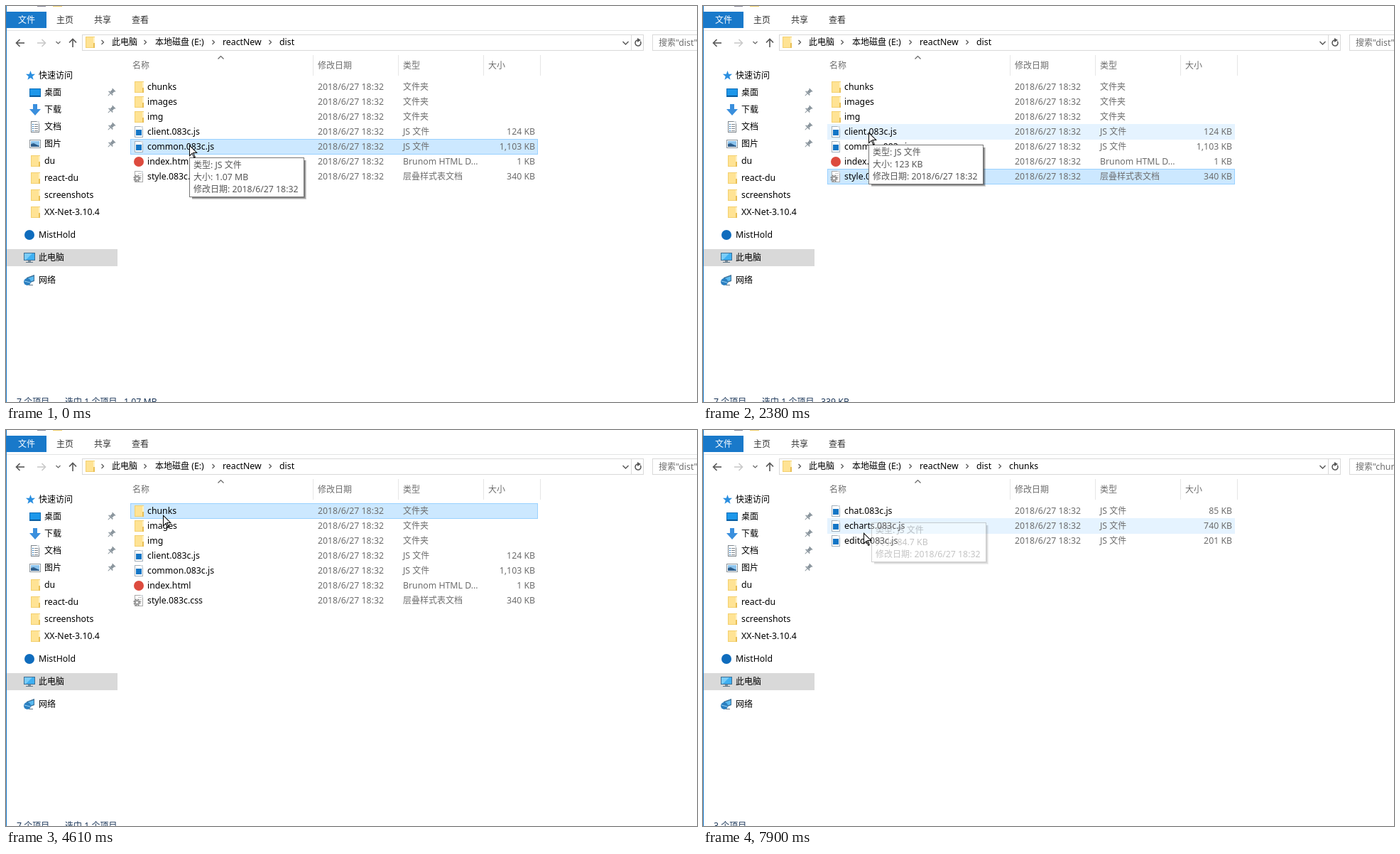
Write an HTML page with a canvas that moves like this. It is 973 by 557 pixels and loops after 8 s.

```html
<!DOCTYPE html>
<html lang="zh-CN">
<head>
<meta charset="utf-8">
<title>dist</title>
<style>
html, body { margin: 0; width: 100%; height: 100%; overflow: hidden; background: #fff; }
canvas { display: block; width: 973px; height: 557px; }
</style>
</head>
<body>
<canvas id="stage" width="973" height="557"></canvas>
<script>
const ctx = document.getElementById('stage').getContext('2d');
const LOOP = 8000, ROW_Y = 103, ROW_H = 21;
const LATIN = '12.3px "Noto Sans", "Open Sans", sans-serif';
const HAN = '12px "Noto Sans CJK SC", "Noto Sans CJK", sans-serif';
const GRAY = '#6d6d6d', INK = '#000', STAMP = '2018/6/27 18:32';

// Pointer: time, x, y
const pointer = [
  [0, 258, 195], [270, 256, 200], [390, 253, 206], [510, 250, 212], [660, 243, 289],
  [940, 245, 231], [1220, 237, 196], [1370, 235, 184], [1490, 233, 178], [1640, 233, 177],
  [2970, 233, 178], [3250, 230, 175], [3400, 223, 160], [3520, 221, 156], [3640, 220, 153],
  [3800, 220, 149], [3940, 220, 147], [4090, 220, 138], [4210, 220, 127], [4360, 220, 119],
  [4610, 221, 119], [5290, 239, 129], [5410, 262, 140], [5560, 257, 138], [5680, 245, 135],
  [5830, 241, 133], [6230, 240, 122], [6350, 239, 117], [6480, 238, 114], [6630, 237, 112],
  [7620, 236, 112], [7770, 231, 131], [7900, 226, 144]
];

// Tooltips: fade holds [time, opacity]
const tips = [
  { x: 258, y: 213, size: '1.07 MB', fade: [[0, 1], [270, .7], [390, .4], [510, .1], [660, 0]] },
  { x: 233, y: 195, size: '123 KB', fade: [[2380, 1], [3400, .6], [3520, .3], [3640, 0]] },
  { x: 239, y: 147, size: '739 KB', fade: [[5410, 1], [6230, .65], [6350, .4], [6480, .18], [6630, .03], [7470, 0]] },
  { x: 237, y: 130, size: '84.7 KB', fade: [[7470, .5], [7620, 1], [7770, .65], [7900, .35]] }
];

const folder = name => ({ name, icon: folderIcon, type: '文件夹', size: '' });
const script = (name, size) => ({ name, icon: scriptIcon, type: 'JS 文件', size });
const distFiles = [
  folder('chunks'), folder('images'), folder('img'),
  script('client.083c.js', '124 KB'), script('common.083c.js', '1,103 KB'),
  { name: 'index.html', icon: pageIcon, type: 'Brunom HTML D...', size: '1 KB' },
  { name: 'style.083c.css', icon: gearIcon, type: '层叠样式表文档', size: '340 KB' }
];
const chunkFiles = [
  script('chat.083c.js', '85 KB'), script('echarts.083c.js', '740 KB'), script('editor.083c.js', '201 KB')
];

function held(keys, t) {
  let found = null;
  for (const k of keys) if (k[0] <= t) found = k;
  return found;
}

function rect(x, y, w, h, fill) {
  ctx.fillStyle = fill;
  ctx.fillRect(x, y, w, h);
}

function frame(x, y, w, h, color) {
  ctx.strokeStyle = color;
  ctx.lineWidth = 1;
  ctx.strokeRect(x + .5, y + .5, w - 1, h - 1);
}

function line(points, color, width = 1) {
  ctx.beginPath();
  points.forEach(([x, y]) => ctx.lineTo(x, y));
  ctx.strokeStyle = color;
  ctx.lineWidth = width;
  ctx.stroke();
}

function shape(points, fill) {
  ctx.beginPath();
  points.forEach(([x, y]) => ctx.lineTo(x, y));
  ctx.closePath();
  ctx.fillStyle = fill;
  ctx.fill();
}

function disc(x, y, r, fill) {
  ctx.beginPath();
  ctx.arc(x, y, r, 0, Math.PI * 2);
  ctx.fillStyle = fill;
  ctx.fill();
}

// Han and Latin runs use their own fonts
function text(str, x, y, color) {
  ctx.fillStyle = color;
  for (const run of str.match(/[\u4e00-\u9fff]+|[^\u4e00-\u9fff]+/g) || []) {
    ctx.font = run.charCodeAt(0) >= 0x4e00 ? HAN : LATIN;
    ctx.fillText(run, x, y);
    x += ctx.measureText(run).width;
  }
}

function textRight(str, x, y, color) {
  ctx.font = LATIN;
  text(str, x - ctx.measureText(str).width, y, color);
}

// Icons are placed by their centre
function folderIcon(x, y) {
  rect(x - 6, y - 8, 13, 16, '#f3d06f');
  rect(x - 5, y - 7, 11, 14, '#ffe394');
  rect(x + 5, y - 7, 2, 8, '#fff1c4');
  rect(x + 5, y + 1, 2, 7, '#e9bf55');
}

function sheet(x, y, color) {
  rect(x - 6, y - 8, 12, 16, '#fff');
  frame(x - 6, y - 8, 12, 16, color);
  shape([[x + 2, y - 8], [x + 6, y - 8], [x + 6, y - 4]], '#d5dbe0');
}

function scriptIcon(x, y) {
  sheet(x, y, '#a3afba');
  rect(x - 4, y - 3, 8, 8, '#1476c6');
}

function pageIcon(x, y) {
  disc(x, y, 7, '#dd4b3e');
}

function gearIcon(x, y) {
  sheet(x, y, '#a9a9a9');
  for (let i = 0; i < 3; i++) rect(x - 1, y - 5 + i * 3, 5, 1, '#c8c8c8');
  ctx.setLineDash([2, 1.4]);
  ctx.beginPath();
  ctx.arc(x - 2.5, y + 2.5, 4.3, 0, Math.PI * 2);
  ctx.strokeStyle = '#858585';
  ctx.lineWidth = 1.6;
  ctx.stroke();
  ctx.setLineDash([]);
  disc(x - 2.5, y + 2.5, 3.6, '#999');
  disc(x - 2.5, y + 2.5, 1.6, '#fff');
}

function desktopIcon(x, y) {
  rect(x - 8, y - 6, 16, 12, '#0b6db8');
  rect(x - 7, y - 5, 14, 9, '#1c97ea');
  rect(x - 7, y + 4, 14, 1, '#0a4d85');
}

function downloadIcon(x, y) {
  shape([[x - 3, y - 8], [x + 3, y - 8], [x + 3, y - 1], [x + 8, y - 1], [x, y + 8], [x - 8, y - 1], [x - 3, y - 1]], '#3a8fdd');
}

function documentIcon(x, y) {
  sheet(x, y, '#7d858c');
  for (let i = 0; i < 4; i++) {
    rect(x - 4, y - 4 + i * 3, 2, 1, '#2f7fc1');
    rect(x - 1, y - 4 + i * 3, 5, 1, '#7d858c');
  }
}

function pictureIcon(x, y) {
  rect(x - 8, y - 6, 16, 12, '#fff');
  frame(x - 8, y - 6, 16, 12, '#8b949b');
  rect(x - 6, y - 4, 12, 8, '#8cc4ee');
  shape([[x - 6, y + 4], [x - 6, y], [x - 2, y - 1], [x + 6, y + 3], [x + 6, y + 4]], '#2f5f8c');
}

function starIcon(x, y) {
  const points = [];
  for (let i = 0; i < 10; i++) {
    const a = i * Math.PI / 5 - Math.PI / 2, r = i % 2 ? 2.9 : 7;
    points.push([x + r * Math.cos(a), y + r * Math.sin(a)]);
  }
  shape(points, '#2b8fe0');
}

function computerIcon(x, y) {
  rect(x - 8, y - 7, 16, 11, '#3c6f96');
  rect(x - 7, y - 6, 14, 9, '#3fb0f2');
  shape([[x - 7, y - 6], [x + 4, y - 6], [x - 5, y + 3], [x - 7, y + 3]], '#7accf8');
  rect(x - 2, y + 4, 4, 2, '#7b8c99');
  rect(x - 5, y + 6, 10, 1, '#5c7385');
}

function networkIcon(x, y) {
  shape([[x - 4, y - 4], [x + 7, y - 8], [x + 7, y + 1], [x - 4, y + 5]], '#3c6f96');
  shape([[x - 3, y - 3], [x + 6, y - 6], [x + 6, y], [x - 3, y + 3]], '#59b9f0');
  disc(x - 3, y + 2, 5, '#2b7fc0');
  line([[x - 7, y + 1], [x + 1, y + 3]], '#9bd4f5');
  rect(x - 1, y + 6, 6, 1, '#5c7385');
}

function pin(x, y) {
  ctx.save();
  ctx.translate(x, y);
  ctx.rotate(Math.PI / 4);
  rect(-2, -5, 4, 5, '#8a959d');
  rect(-3, -6, 6, 1.5, '#8a959d');
  rect(-4, 0, 8, 1.5, '#8a959d');
  rect(-.5, 1, 1, 5, '#8a959d');
  ctx.restore();
}

function chevron(x, y) {
  line([[x - 1.5, y - 3], [x + 1.5, y], [x - 1.5, y + 3]], '#555', 1.2);
}

function arrow(x, y, angle, color) {
  ctx.save();
  ctx.translate(x, y);
  ctx.rotate(angle);
  line([[6, 0], [-5, 0]], color, 1.6);
  line([[-.5, -5], [-5.5, 0], [-.5, 5]], color, 1.6);
  ctx.restore();
}

function ribbon() {
  rect(44, 0, 12, 1, '#8c8c9c');
  rect(66, 0, 13, 1, '#f0cf6a');
  rect(0, 0, 1, 557, '#1979ca');
  rect(1, 34, 972, 1, '#e3e4e5');
  rect(0, 8, 57, 23, '#1979ca');
  text('文件', 17, 24, '#fff');
  ['主页', '共享', '查看'].forEach((s, i) => text(s, 71 + i * 53, 24, '#333'));
}

function addressBar(inChunks) {
  arrow(20, 52, 0, '#555');
  arrow(50, 52, Math.PI, '#c9c9c9');
  line([[70.5, 50], [73.5, 53], [76.5, 50]], '#666', 1.2);
  arrow(94, 52, Math.PI / 2, '#555');
  frame(107, 40, 774, 23, '#d9d9d9');
  frame(880, 40, 18, 23, '#d9d9d9');
  frame(910, 40, 80, 23, '#d9d9d9');
  folderIcon(118, 51);
  const path = [[136, '此电脑', 149], [196, '本地磁盘 (E:)', 210], [292, 'reactNew', 305], [372, 'dist', 385]];
  if (inChunks) path.push([418, 'chunks', 431]);
  for (const [cx, label, x] of path) {
    chevron(cx, 51);
    text(label, x, 55, INK);
  }
  line([[868.5, 50], [872.5, 54], [876.5, 50]], '#555', 1.4);
  ctx.beginPath();
  ctx.arc(890, 52, 4, -.6, 4.6);
  ctx.strokeStyle = '#555';
  ctx.lineWidth = 1.5;
  ctx.stroke();
  shape([[889, 45], [894, 48], [889, 51]], '#555');
  text('搜索"' + (inChunks ? 'chunks' : 'dist') + '"', 919, 56, GRAY);
}

function sidebar() {
  starIcon(34.5, 98);
  text('快速访问', 46, 102, INK);
  const quick = [['桌面', desktopIcon], ['下载', downloadIcon], ['文档', documentIcon], ['图片', pictureIcon],
    ['du'], ['react-du'], ['screenshots'], ['XX-Net-3.10.4']];
  quick.forEach(([label, icon], i) => {
    const y = 122 + i * 24;
    (icon || folderIcon)(41, y);
    if (icon) pin(148, y);
    text(label, 54, y + 4, INK);
  });
  disc(33, 322, 7, '#0f6cbd');
  text('MistHold', 46, 326, INK);
  rect(1, 342, 156, 24, '#d9d9d9');
  computerIcon(33, 354);
  text('此电脑', 46, 358, INK);
  networkIcon(33, 386);
  text('网络', 46, 390, INK);
}

function header() {
  line([[298.5, 74.5], [302.5, 70.5], [306.5, 74.5]], '#666', 1.2);
  text('名称', 178, 88, GRAY);
  ['修改日期', '类型', '大小'].forEach((s, i) => text(s, 439 + i * 120, 88, GRAY));
  [432, 552, 672, 752].forEach(x => rect(x, 69, 1, 29, '#e6e6e6'));
}

function fileList(files, selected, hover) {
  files.forEach((file, i) => {
    const y = ROW_Y + i * ROW_H;
    if (i === selected) {
      rect(175, y, 574, 22, '#cce8ff');
      frame(175, y, 574, 22, '#99d1ff');
    } else if (i === hover) {
      const top = i === selected + 1 ? 1 : 0;
      rect(175, y + top, 574, 22 - top, '#e5f3ff');
    }
  });
  files.forEach((file, i) => {
    const y = ROW_Y + i * ROW_H + 15;
    file.icon(187, y - 4);
    text(file.name, 199, y, INK);
    text(STAMP, 439, y, GRAY);
    text(file.type, 559, y, GRAY);
    textRight(file.size, 745, y, GRAY);
  });
}

function statusBar(count, size) {
  const color = '#1e395b';
  text(count + ' 个项目', 15, 561, color);
  if (size === null) return;
  text('选中 1 个项目', 83, 561, color);
  text(size, 166, 561, color);
}

function tooltip({ x, y, size }, alpha) {
  ctx.globalAlpha = alpha;
  for (let i = 0; i < 3; i++) {
    const shade = `rgba(0,0,0,${.5 - i * .16})`;
    rect(x + 162 + i, y + 4, 1, 52 + i, shade);
    rect(x + 4, y + 56 + i, 159 + i, 1, shade);
  }
  rect(x, y, 162, 56, '#fff');
  frame(x, y, 162, 56, '#767676');
  ['类型: JS 文件', '大小: ' + size, '修改日期: ' + STAMP].forEach((s, i) => text(s, x + 6, y + 15 + i * 17, '#575757'));
  ctx.globalAlpha = 1;
}

function cursor(x, y) {
  const outline = [[0, 0], [0, 17], [4, 13], [6.5, 19], [9, 18], [6.5, 12], [12, 12]];
  const inner = [[1, 2.4], [1, 14.6], [4.3, 11.4], [7, 17.6], [7.7, 17.3], [5, 11], [9.6, 11]];
  const move = points => points.map(([px, py]) => [x + px, y + py]);
  shape(move(outline), '#000');
  shape(move(inner), '#fff');
}

function draw(t) {
  const [, x, y] = held(pointer, t);
  const inChunks = t >= 4890;
  const selected = inChunks ? -9 : t < 940 ? 4 : t < 4610 ? 6 : 0;
  rect(0, 0, 973, 557, '#fff');
  ribbon();
  addressBar(inChunks);
  sidebar();
  header();
  fileList(inChunks ? chunkFiles : distFiles, selected, Math.floor((y - ROW_Y) / ROW_H));
  statusBar(inChunks ? 3 : 7, inChunks ? null : t < 940 ? '1.07 MB' : t < 4610 ? '339 KB' : '');
  for (const tip of tips) {
    const key = held(tip.fade, t);
    if (key && key[1] > 0) tooltip(tip, key[1]);
  }
  cursor(x, y);
}

const start = performance.now();
function tick() {
  draw((performance.now() - start) % LOOP);
  requestAnimationFrame(tick);
}
tick();
</script>
</body>
</html>
```
